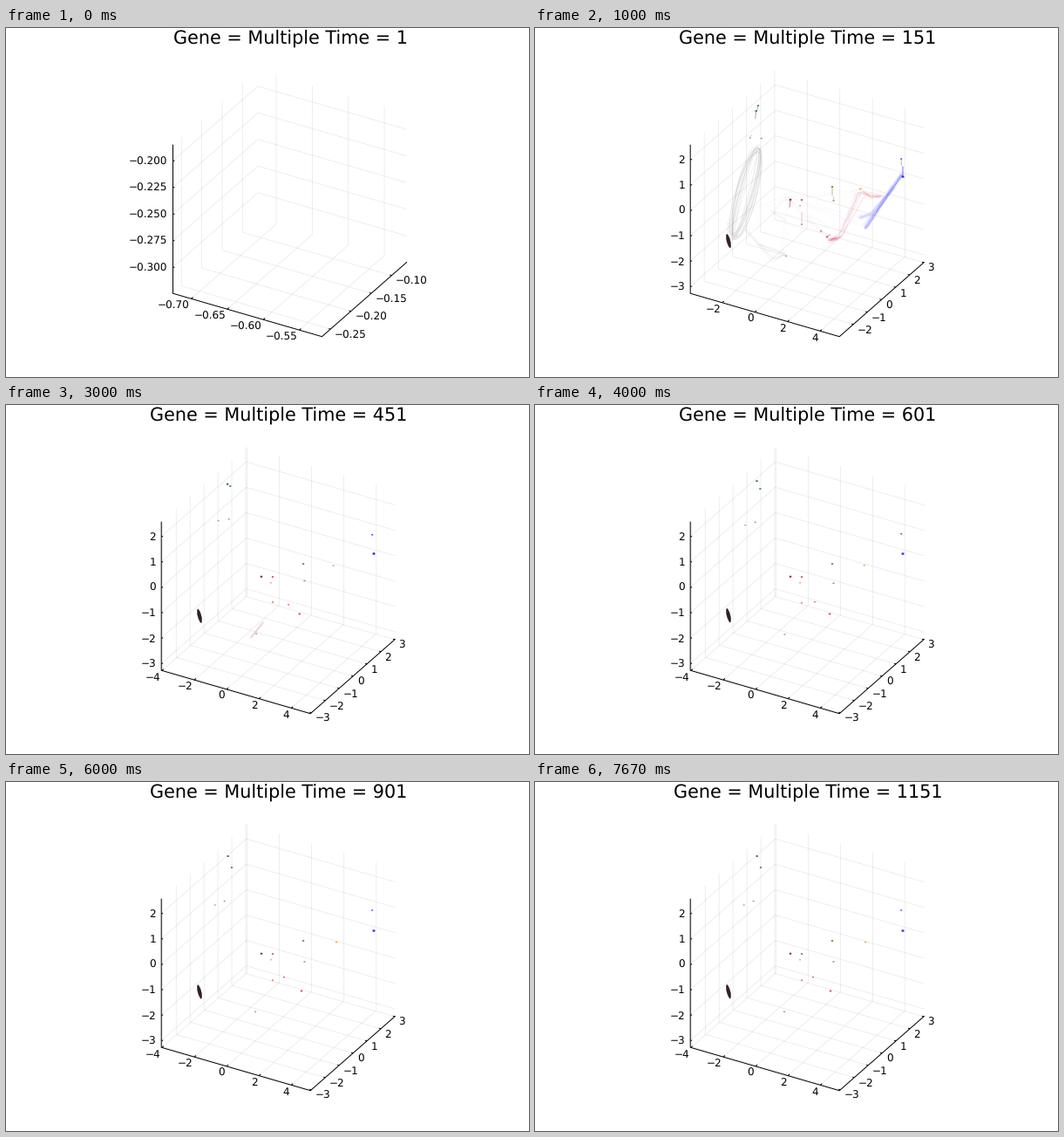
Recreate the animation shown at these times as a matplotlib script. Size 600 by 400 pixels, loop 8000 ms.

```python
import numpy as np
import matplotlib.pyplot as plt
from matplotlib.animation import FuncAnimation

FRAMES, LOOP_MS = 24, 8000
PX = 0.72  # points per pixel at 100 dpi
X_DIR = np.array([171.0, 49.5])
Y_DIR = np.array([97.5, -85.5])
Z_DIR = np.array([0.0, -170.5])

plt.rcParams.update({"font.family": "DejaVu Sans", "text.hinting": "none",
                     "path.snap": False})
fig = plt.figure(figsize=(6, 4), dpi=100, facecolor="white")
ax = fig.add_axes([0, 0, 1, 1])


def line(points, color="black", width=1.0, alpha=1.0, cap="butt"):
    ax.plot(*np.transpose(points), color=color, lw=width * PX, alpha=alpha,
            solid_capstyle=cap)


def limits(frame):
    """Range, tick step and decimals for the x, y and z axes."""
    if frame == 0:
        return [(-0.7254, -0.5186, 0.05, 2), (-0.2708, -0.0625, 0.05, 2),
                (-0.3246, -0.1848, 0.025, 3)]
    missing = 0.6 * np.exp(1 - frame)  # the data range is still growing
    return [(-4.035 + missing, 5.18, 2, 0), (-3.07 + missing, 3.046, 1, 0),
            (-3.275 + 4 * missing**4, 2.585, 1, 0)]


def ticks(low, high, step, digits):
    """Position along the axis and text of each tick."""
    for i in range(int(np.ceil(low / step)), int(np.floor(high / step)) + 1):
        text = f"{i * step:.{digits}f}".replace("-", "\u2212")
        yield (i * step - low) / (high - low), text


def draw_axis(spec, start, direction, wall, far_wall, mark, offset, align):
    for share, text in ticks(*spec):
        p = start + share * direction
        line([p, p + wall, p + wall + far_wall], width=0.75, alpha=0.09)
        line([p, p + mark])
        ax.text(*(p + offset), text, ha=align, va="baseline", size=12 * PX)


def draw_box(frame):
    origin = np.array([191.5 if frame == 0 else 178.2, 304.2])
    corner = origin + X_DIR
    x_spec, y_spec, z_spec = limits(frame)
    draw_axis(x_spec, origin, X_DIR, Y_DIR, Z_DIR, 0.02 * Y_DIR, (-1.8, 11.2), "right")
    draw_axis(y_spec, corner, Y_DIR, -X_DIR, Z_DIR, -0.012 * X_DIR, (4.6, 10.4), "left")
    draw_axis(z_spec, origin, Z_DIR, Y_DIR, X_DIR, (2, 0), (-6, 4.4), "right")
    line([origin + Z_DIR, origin, corner, corner + Y_DIR])
    ax.text(origin[0] + 134.7, 18.3, f"Gene = Multiple Time = {1 + 50 * frame}",
            ha="center", va="baseline", size=20.8 * PX)


def pulse(frame, peak, width):
    return np.exp(-((frame - peak) / width) ** 2)


def draw_orbits(frame):
    """Slim tilted loops that start and end at the dark core."""
    alpha = 0.10 * pulse(frame, 3, 2.1)
    if alpha < 0.006:
        return
    rng = np.random.default_rng(4)
    t = np.linspace(0, 2 * np.pi, 60)
    for i in range(16):
        tilt = rng.normal(0.255, 0.025)
        along = rng.normal(53, 2) * np.cos(t)
        across = rng.uniform(4, 12) * np.sin(t)
        cx, cy = rng.normal((242, 190), 1.3)
        x = cx + along * np.sin(tilt) + across * np.cos(tilt)
        y = cy - along * np.cos(tilt) + across * np.sin(tilt)
        line(np.column_stack([x, y]), "#a07880" if i % 4 == 0 else "#666666", 0.7, alpha)


# color, frame of strongest showing, strands, spread, path
TRAILS = [
    ("#a08088", 4, 5, 1.3, [(241, 231), (274, 266), (288, 258), (256, 247)]),
    ("#b08070", 5, 12, 1.3, [(271, 210), (289, 221)]),
    ("#d9a090", 8, 16, 0.8, [(281, 267), (295, 249)]),
    ("#333333", 5, 10, 0.8, [(221, 222), (223, 243)]),
    ("#e0508c", 3, 8, 2.0, [(338, 243), (350, 238), (374, 188), (397, 194)]),
    ("#e070c0", 5, 12, 2.4, [(349, 239), (368, 191)]),
    ("#eeb070", 5, 14, 2.4, [(364, 192), (374, 188)]),
    ("#d8603c", 3, 5, 1.0, [(376, 187), (386, 195), (398, 192)]),
    ("#e03070", 3, 12, 1.5, [(338, 243), (348, 242)]),
    ("#3535ff", 3, 16, 1.2, [(379, 230), (421, 168)]),
    ("#6a6aff", 3, 9, 1.7, [(372, 218), (386, 214), (412, 182)]),
]
# early rays from the common starting point
TRAILS += [(color, 1, 4, 2, [(288, 194), path[0]]) for color, _, _, _, path in TRAILS]


def draw_trails(frame):
    for seed, (color, peak, count, spread, path) in enumerate(TRAILS):
        alpha = 0.13 * pulse(frame, peak, 1.4)
        if alpha < 0.006:
            continue
        rng = np.random.default_rng(seed)
        knots = np.linspace(0, 1, len(path))
        s = np.linspace(0, 1, 8 * len(path))
        for _ in range(count):
            wobbly = path + rng.normal(0, spread, (len(path), 2))
            curve = np.column_stack([np.interp(s, knots, c) for c in wobbly.T])
            line(curve + rng.normal(0, 0.25 * spread, curve.shape), color, 0.7, alpha)


# color, size, resting place, starting offset, early tail
DOTS = [
    ("#1d5a28", 1.7, (254.7, 85), (-1, 10), (-1, 9)),
    ("#2d7038", 1.6, (259, 98), (-3, -9), (-1, 5)),
    ("#8a958a", 1.3, (239.7, 141), (7, -15), (2, -4)),
    ("#7a857a", 1.3, (250.7, 136.5), (9, -10), (1, 1)),
    ("#7a1220", 1.9, (293, 196.7), (0, 0), (-1, 9)),
    ("#b04048", 1.6, (306, 197), (0, 0), (1, 0)),
    ("#e8a890", 1.5, (304, 203.7), (0, 0), (1, 1)),
    ("#d08060", 1.5, (306, 227.2), (0, -2), (0, -14)),
    ("#d06088", 1.4, (319, 223.7), (9, 9), (2, 1)),
    ("#e02898", 1.8, (339, 239.5), (-4, 0), (4, -3)),
    ("#77702c", 1.7, (341, 182), (0, 0), (0, 10)),
    ("#8a8a78", 1.5, (342.5, 206), (0, -8), (0, -5)),
    ("#e8a050", 1.6, (379, 183.5), (-6, 1), (3, -1)),
    ("#3a3af0", 1.4, (420.2, 147), (0, 3), (0, 8)),
    ("#1010e0", 2.2, (422, 170.5), (0, 0), (0, -12)),
    ("#a89098", 1.5, (286, 263.3), (2, -2), (1, 0)),
]


def draw_dots(frame):
    """Dots glide to rest while their tails shrink."""
    if frame < 2:
        return
    drift = 0.5 + 0.5 * np.cos(np.pi * np.clip((frame - 3) / 13, 0, 1))
    tail_length = np.exp(-(frame - 3) / 3)
    for color, size, place, offset, tail in DOTS:
        p = np.array(place) + drift * np.array(offset)
        tip = p + tail_length * np.array(tail)
        line([p, tip], color, 0.6 * size, 0.45)
        line([p - (0.3, 0), p + (0.3, 0)], color, size, 0.9, "projecting")


def draw_core(frame):
    """Dark leaf-shaped cluster that slowly rises."""
    if frame < 1:
        return
    center = np.array([222, 240 + 4.2 * np.exp(-(frame - 3) / 7)])
    s = np.linspace(-1, 1, 20)[:, None]
    middle = center + s * (1.9, 8)
    bulge = 1.9 * (1 - s**2) ** 0.7 * (1, -0.1)
    ax.fill(*np.vstack([middle - bulge, (middle + bulge)[::-1]]).T,
            color="#180a10", alpha=0.92, lw=0.3)
    line(middle[4:-4], "#52202e", 0.8, 0.7)


def update(frame):
    ax.clear()
    ax.set(xlim=(0, 600), ylim=(400, 0))
    ax.axis("off")
    draw_box(frame)
    if frame > 0:
        draw_orbits(frame)
        draw_trails(frame)
        draw_core(frame)
        draw_dots(frame)
    return []


animation = FuncAnimation(fig, update, frames=FRAMES, init_func=lambda: [],
                          interval=LOOP_MS / FRAMES, repeat=True, repeat_delay=0)
plt.show()
```
